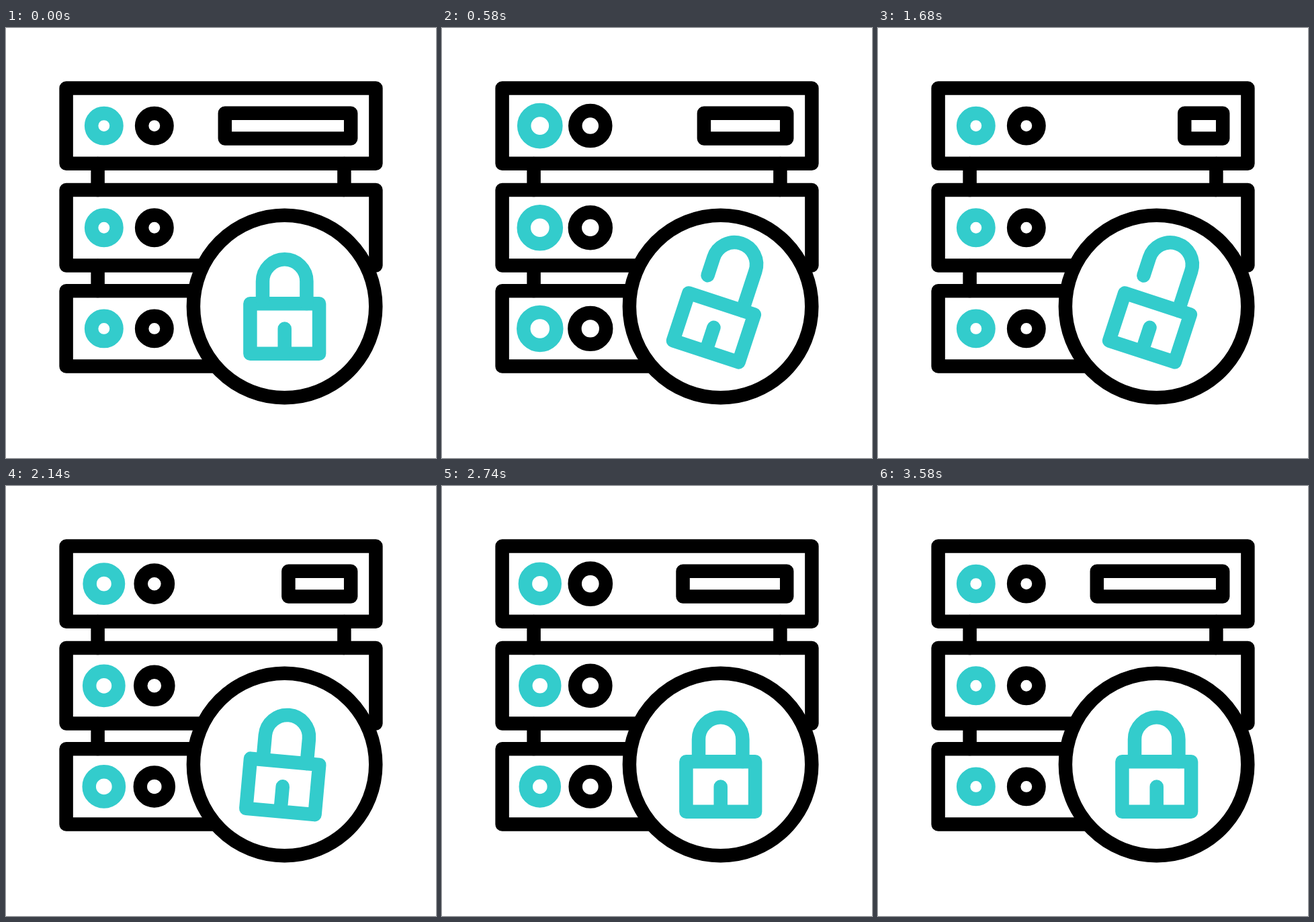
Animation of 640 by 640 pixels, one loop 3600 ms. Source, as an HTML page:

```html
<!DOCTYPE html>
<html lang="en">
<head>
<meta charset="utf-8">
<title>Server lock</title>
<style>
html, body { margin: 0; width: 100%; height: 100%; overflow: hidden; background: #fff; }
svg { display: block; width: 100vw; height: 100vh; }
svg * { fill: none; stroke-width: 20.5; stroke-linecap: round; stroke-linejoin: round; }
.dark { stroke: #000; }
.teal { stroke: #3cc; }
</style>
</head>
<body>
<svg viewBox="0 0 640 640">
  <g class="dark">
    <path d="M136.6 202V241M503.4 202V241M136.6 354V391"/>
    <path d="M89.6 89.4H550.4V201.8H89.6ZM89.6 241.1H550.4V353.5H89.6Z"/>
    <path d="M285 391.2H89.6V503.6H312" style="stroke-linecap:butt"/>
    <path id="display"/>
  </g>
  <g id="lights"></g>
  <circle class="dark" cx="414.6" cy="414.5" r="135.7" style="fill:#fff"/>
  <g id="lock" class="teal">
    <path d="M363.4 410.2H466.1V484.8H363.4ZM414.7 447.4V482"/>
    <path id="shackle"/>
  </g>
</svg>
<script>
const LOOP = 3600, HALF = LOOP / 2;
const get = id => document.getElementById(id);
const display = get("display"), lock = get("lock"), shackle = get("shackle");

// The lights pulse from the bottom row up, the teal column first
const lights = [];
[145.6, 297.3, 447.4].forEach((y, row) => {
  for (let column = 0; column < 2; column++) {
    const ring = document.createElementNS("http://www.w3.org/2000/svg", "circle");
    ring.setAttribute("class", column ? "dark" : "teal");
    ring.setAttribute("cx", 145.8 + 75 * column);
    ring.setAttribute("cy", y);
    get("lights").append(ring);
    lights.push({ ring, delay: 110 * column + 45 * (2 - row) });
  }
});

const clamp = x => Math.min(1, Math.max(0, x));
const ease = x => Math.sin(Math.PI / 2 * x) ** 2;
const smooth = (from, to, t) => ease(clamp((t - from) / (to - from)));
const pulse = t => t < 600 ? clamp(t / 600) : clamp((1260 - t) / 660) ** 1.3;

function draw(t) {
  const halfTime = t % HALF;

  const slid = ease((halfTime / HALF) ** 0.625);
  const left = 325.8 + 131 * (t < HALF ? slid : 1 - slid);
  display.setAttribute("d", `M${left} 126.8H513.2V164.5H${left}Z`);

  for (const { ring, delay } of lights) ring.setAttribute("r", 18.7 + 6 * pulse(halfTime - delay));

  // The open lock drifts a little further before it closes
  const drift = smooth(540, 1300, t) - smooth(1300, 1640, t);
  const angle = 18.2 * (smooth(0, 540, t) - smooth(1640, 2420, t)) + drift;
  const rise = 28.5 * (smooth(60, 540, t) - smooth(1640, 2290, t)) + 2 * drift;
  lock.setAttribute("transform", `rotate(${angle} 414.6 414.5)`);
  shackle.setAttribute("d",
    `M382 ${405 - rise}V${377 - rise}a32.7 32.7 0 0 1 65.4 0V410`);
}

const start = performance.now();
function frame() {
  draw((performance.now() - start) % LOOP);
  requestAnimationFrame(frame);
}
frame();
</script>
</body>
</html>
```
